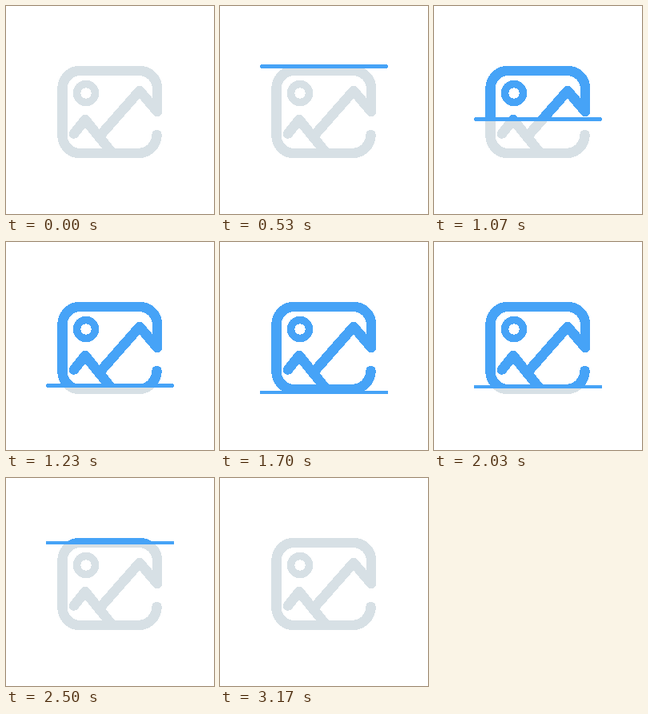
An HTML page for the animation above (3360 ms loop, 260 px wide and 260 px high).

```html
<!DOCTYPE html>
<html lang="en">
<head>
<meta charset="utf-8">
<title>Image scan</title>
<style>
  html, body { margin: 0; width: 100%; height: 100%; overflow: hidden; background: #fff; }
  svg { display: block; width: 260px; height: 260px; }
</style>
</head>
<body>
<svg viewBox="0 0 260 260" fill="none" stroke-linecap="round" stroke-linejoin="round" shape-rendering="crispEdges">
  <defs>
    <clipPath id="scanned"><rect id="reveal" width="260" height="0"/></clipPath>
    <g id="icon">
      <path stroke-width="12.5" d="M188.5 161 A23 23 0 0 1 166 184 H92 A21.5 22 0 0 1 70.5 162
        V103 A21.5 22 0 0 1 92 81 H167 A22 22 0 0 1 189 103
        V132 L167 106 L119.5 160 M85 159.5 L99 142 L132 183"/>
      <circle stroke-width="9.5" cx="100" cy="109" r="11.5"/>
    </g>
  </defs>
  <use href="#icon" stroke="#d7e0e5"/>
  <g clip-path="url(#scanned)"><use href="#icon" stroke="#46a3f7"/></g>
  <path id="line" stroke="#46a3f7" stroke-width="4.5"/>
</svg>
<script>
const LOOP = 3360, TOP = 75, BOTTOM = 188;
const reveal = document.getElementById('reveal');
const line = document.getElementById('line');

// Cubic bezier easing with control points (x1, 0) and (x2, 1).
function bezier(x1, x2) {
  return x => {
    if (x <= 0) return 0;
    if (x >= 1) return 1;
    let lo = 0, hi = 1;
    for (let i = 0; i < 24; i++) {
      const s = (lo + hi) / 2, r = 1 - s;
      const at = 3 * x1 * s * r * r + 3 * x2 * s * s * r + s * s * s;
      if (at < x) lo = s; else hi = s;
    }
    return lo * lo * (3 - 2 * lo);
  };
}

const sweep = bezier(1, 0.16);
const grow = bezier(0.4, 0.6);
const span = (t, start, length) => (t - start) / length;

function draw(t) {
  const depth = sweep(span(t, 402, 1180)) - sweep(span(t, 1635, 1180));
  const y = TOP + (BOTTOM - TOP) * depth;
  const width = grow(span(t, 15, 315)) - grow(span(t, 2835, 325));
  const half = 78 * width;

  reveal.setAttribute('height', y);
  line.setAttribute('d', width > 0 ? `M${130 - half} ${y}H${130 + half}` : '');
}

const start = performance.now();
function tick() {
  draw((performance.now() - start) % LOOP);
  requestAnimationFrame(tick);
}
tick();
</script>
</body>
</html>
```
